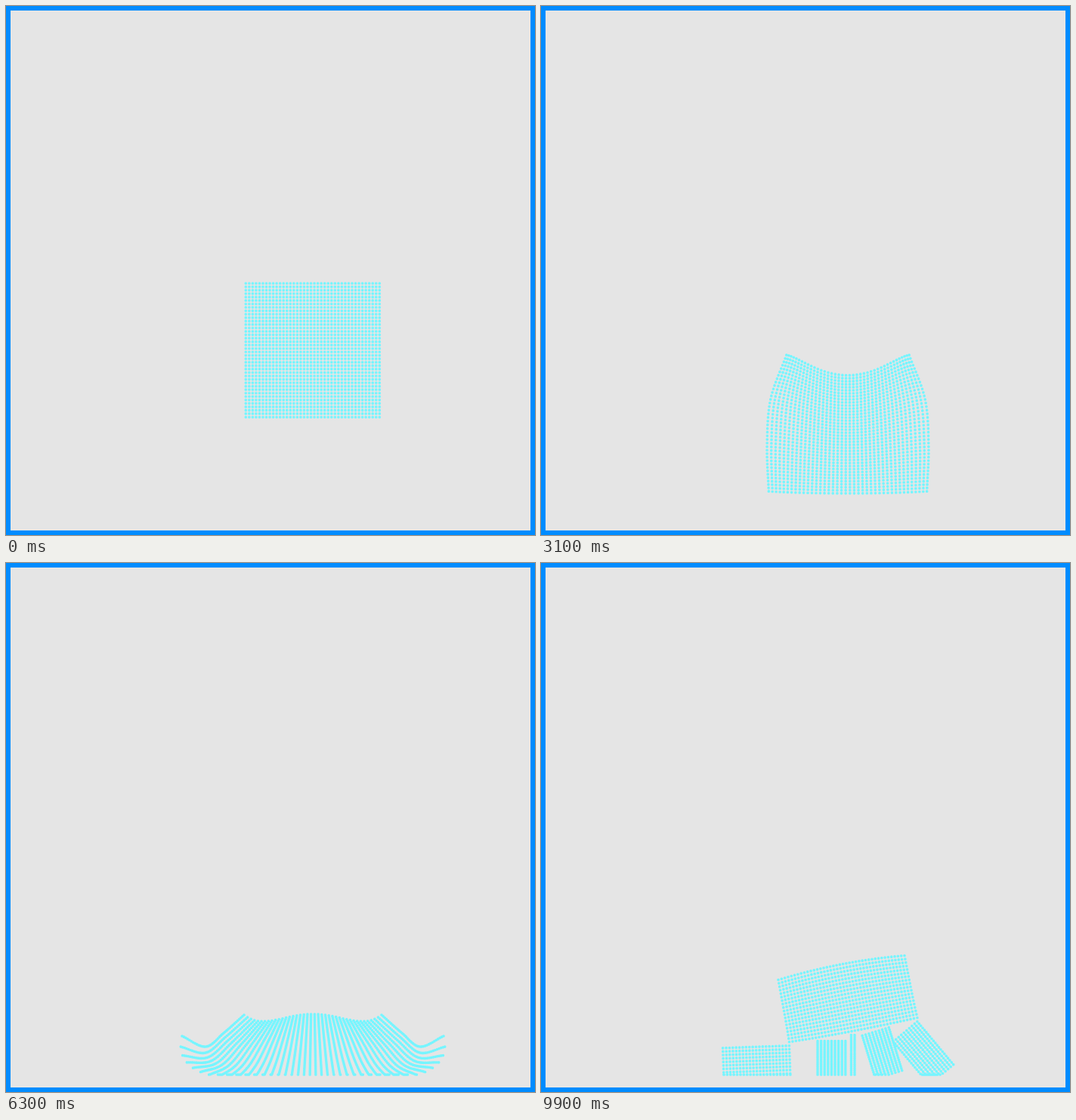
Recreate the animation shown at these times as an HTML page with a canvas. Size 700 by 700 pixels, loop 10000 ms.

```html
<!DOCTYPE html>
<html lang="en">
<head>
<meta charset="utf-8">
<title>Bouncing jelly</title>
<style>
html, body { margin: 0; width: 100%; height: 100%; overflow: hidden; background: #e5e5e5; }
canvas { display: block; }
</style>
</head>
<body>
<canvas id="stage" width="700" height="700"></canvas>
<script>
const ctx = document.getElementById('stage').getContext('2d');
const N = 40, FLOOR = 677, GRAVITY = 92.6, GAP = 4.6, DOT = 1.85;

const lerp = ([a, b], k) => a + (b - a) * k;
const ramp = (t, t0, t1) => Math.min(1, Math.max(0, (t - t0) / (t1 - t0)));

// Catmull-Rom through evenly spaced values, u in 0..1
function spline(p, u) {
  const n = p.length - 1, k = Math.min(Math.floor(u * n), n - 1), f = u * n - k;
  const b = p[k], c = p[k + 1];
  const a = k ? p[k - 1] : 2 * b - c;
  const d = k + 2 <= n ? p[k + 2] : 2 * c - b;
  return b + f * (c - a + f * (2 * a - 5 * b + 4 * c - d + f * (3 * (b - c) + d - a))) / 2;
}

// sideX, sideY: the edge from top to bottom; pairs hold a top and a bottom value.
// mid: centre line, spread: column stretch at the centre, bend: bow of the rows,
// base: centre x, lean, tilt, and fanning of the lower corners.
const jelly = (sideX, sideY, mid, spread, bend = [0, 0], base = [406, 0, 0, 0]) =>
  ({ sideX, sideY, mid, spread, bend, base });

const fall = t => {
  const half = 88.5, top = 367 + GRAVITY * t * t / 2;
  return jelly(Array(4).fill(half), [0, 1, 2, 3].map(k => top + k * 2 * half / 3),
    [top, top + 2 * half], [half, half], [0, 0], [405.8, 0, 0, 0]);
};
const landed = jelly([87, 95, 104, 109], [546, 594, 636, 675], [552, 677], [89, 105]);
const rising = jelly([79, 105, 108, 103], [416, 470, 531, 589], [447, 591.5], [95, 112], [-30, 0]);
const curled = jelly([62, 120, 93, 119], [458, 505, 597, 665], [534, 638], [148, 148], [-49, 89]);
const splat = jelly([91, 118, 142, 173], [598, 622, 640, 626], [597, 677], [92, 150], [36, 100],
  [406, 0, 0, 150]);
const split = jelly([77, 87, 94, 98], [461, 525, 590, 654], [476, 654], [79, 82], [-18, 0],
  [410, -4, 3, 0]);
const toppled = jelly([83.5, 84, 86, 87], [535.5, 595, 654, 713], [531, 722], [83, 84], [0, 0],
  [397.5, 34, -16, 0]);

// Applies fn to every number of a pose, together with its partners in other poses
const combine = (fn, first, ...rest) => Object.fromEntries(Object.entries(first).map(
  ([name, list]) => [name, list.map((v, n) => fn(v, ...rest.map(p => p[name][n])))]));

// A blend of two poses, moved so that its edge runs from top to bottom
function between(p, q, k, top, bottom) {
  const pose = combine((a, b) => lerp([a, b], k), p, q);
  const y0 = pose.sideY[0], scale = (bottom - top) / (pose.sideY[3] - y0);
  const place = y => top + (y - y0) * scale;
  return { ...pose, sideY: pose.sideY.map(place), mid: pose.mid.map(place) };
}

const keys = [
  [0, fall(0)],
  [0.8, fall(0.8)],
  [1.6, fall(1.6)],
  [2.2, landed],
  [2.7, between(landed, rising, 0.4, 510, 676)],
  [3.3, between(landed, rising, 0.85, 441, 624)],
  [3.9, rising],
  [4.4, between(rising, curled, 0.4, 410, 602)],
  [5.3, curled],
  [6.3, splat],
  [7, between(splat, split, 0.5, 563, 680)],
  [7.9, split],
  [8.8, between(split, toppled, 0.4, 461, 650)],
  [9.9, toppled]
];

// Cubic through the keys with parabolic slopes
function poseAt(t) {
  let k = 0;
  while (k < keys.length - 2 && keys[k + 1][0] <= t) k++;
  const near = [k - 1, k, k + 1, k + 2].map(m => keys[Math.min(Math.max(m, 0), keys.length - 1)]);
  const [t0, t1, t2, t3] = near.map(key => key[0]);
  const h = t2 - t1, f = (t - t1) / h, g = 1 - f;
  return combine((a, b, c, d) => {
    const rate = (c - b) / h;
    const m1 = t1 > t0 ? ((b - a) / (t1 - t0) * h + rate * (t1 - t0)) / (t2 - t0) : 0;
    const m2 = t3 > t2 ? (rate * (t3 - t2) + (d - c) / (t3 - t2) * h) / (t3 - t1) : rate;
    return g * g * ((1 + 2 * f) * b + f * h * m1) + f * f * ((1 + 2 * g) * c - g * h * m2);
  }, ...[near[0], near[1], near[2], near[3]].map(key => key[1]));
}

// Point of the unbroken sheet: s from -1 to 1 across, v from 0 to 1 down
function sheet(p, s, v) {
  const [cx, lean, tilt, fan] = p.base;
  const q = s * s, bow = q * (1 - q);
  const a = lerp(p.spread, v), m = lerp(p.mid, v);
  return [
    cx + lean * v + s * (a + (spline(p.sideX, v) - a) * q + fan * v * bow),
    m + (spline(p.sideY, v) - m) * q + lerp(p.bend, v) * bow + tilt * s
  ];
}

// Strips below the tear: first column, last column, final swing in degrees
const strips = [[0, 9, 88], [10, 18, 0], [19, 20, 0], [21, 29, -17], [30, 39, -40]];
const TEAR = 19;
const across = i => 2 * i / (N - 1) - 1;

// Each strip hangs from its outer corner and is shortened by the floor
function hang(pose, [first, last, swing], t) {
  const outer = first < N / 2 ? first : last, s = across(outer);
  const splay = 1 - ramp(t, 6.6, 7.8), topple = ramp(t, 7.9, 9.9);
  const angle = (swing * topple - 85 * s * splay) * Math.PI / 180;
  const sin = Math.sin(angle), cos = Math.cos(angle);
  const [x, top] = sheet(pose, s * (1.3 - 0.3 * Math.abs(s)), (TEAR - 1) / (N - 1));
  const y = top + 5;
  const room = FLOOR - y - ((first + last) / 2 - outer) * GAP * sin;
  const length = Math.max(10, Math.min(70 + 25 * s * s, room / Math.max(cos, 0.2)));
  return (i, j) => {
    const w = (i - outer) * GAP, l = (j - TEAR) / (N - 1 - TEAR) * length;
    return [x + w * cos - l * sin, y + w * sin + l * cos];
  };
}

function draw(now) {
  const t = Math.floor(now % 10000 / 100) / 10;
  const pose = poseAt(t), torn = ramp(t, 6.3, 6.9);
  const legs = strips.map(strip => hang(pose, strip, t));

  ctx.fillStyle = '#008cff';
  ctx.fillRect(0, 0, 700, 700);
  ctx.fillStyle = '#e5e5e5';
  ctx.fillRect(6, 6, 688, 688);

  ctx.fillStyle = t >= 4.9 && t < 5.7 ? '#12bbff' : '#76f5ff';
  ctx.beginPath();
  for (let i = 0; i < N; i++) {
    const leg = legs[strips.findIndex(strip => i <= strip[1])];
    for (let j = 0; j < N; j++) {
      let [x, y] = sheet(pose, across(i), j / (N - 1));
      if (torn && j >= TEAR) {
        const [lx, ly] = leg(i, j);
        x = lerp([x, lx], torn);
        y = lerp([y, ly], torn);
      }
      y = Math.min(y, FLOOR);
      ctx.moveTo(x + DOT, y);
      ctx.arc(x, y, DOT, 0, 2 * Math.PI);
    }
  }
  ctx.fill();
}

const start = performance.now();
function loop() {
  draw(performance.now() - start);
  requestAnimationFrame(loop);
}
loop();
</script>
</body>
</html>
```
